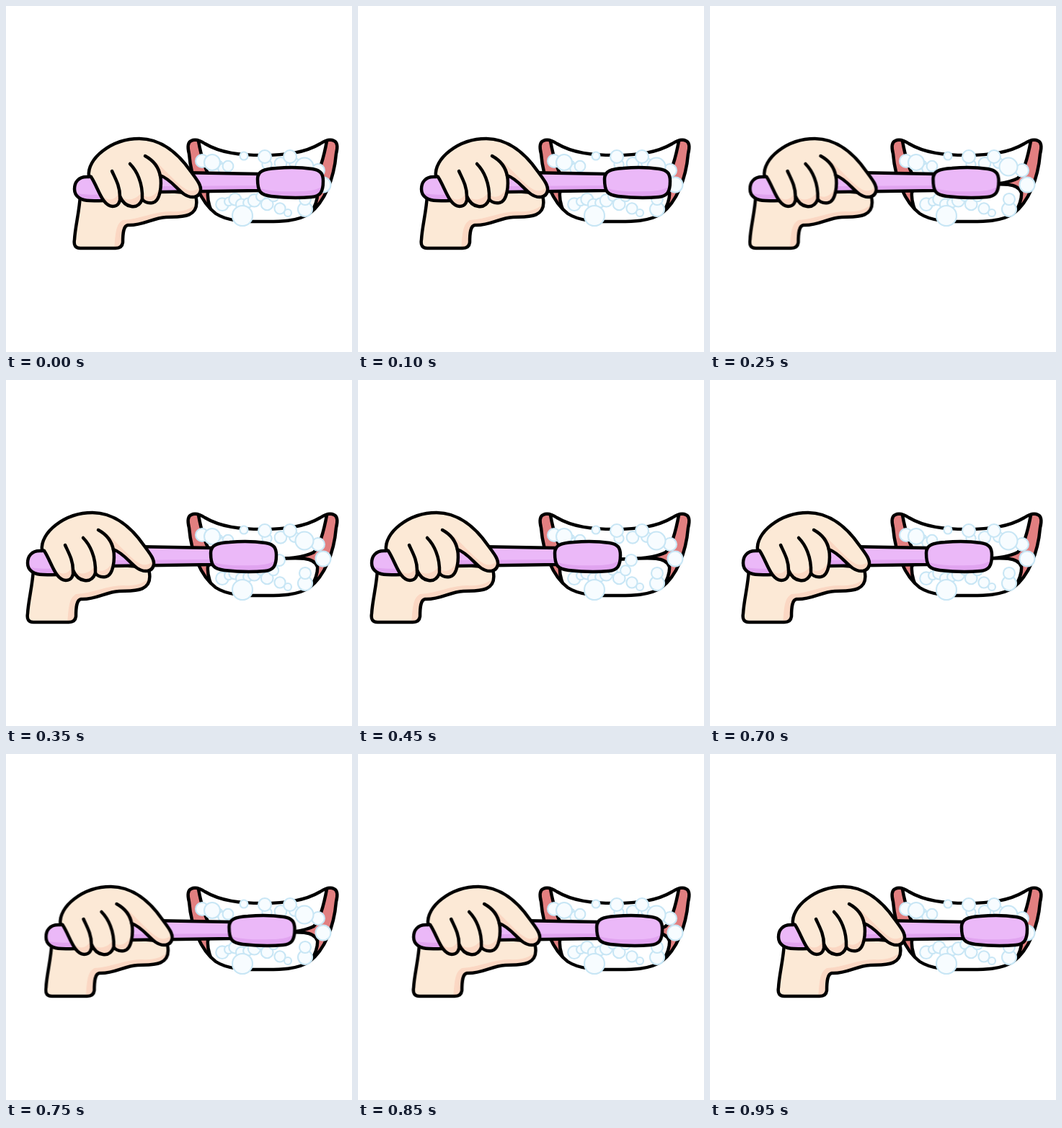
Recreate the animation shown at these times as an HTML page. Size 480 by 480 pixels, loop 1 s.

```html
<!DOCTYPE html>
<html lang="en">
<head>
<meta charset="utf-8">
<title>Brushing teeth</title>
<style>
  html, body { margin: 0; width: 100%; height: 100%; overflow: hidden; background: #fff; }
  svg { display: block; width: 100vw; height: 100vh; }
  .ink { stroke: #000; stroke-width: 4.5; stroke-linecap: round; stroke-linejoin: round; }
  .line { fill: none; }
  .lip { fill: #e27f80; }
  .tooth { fill: #fff; }
  .skin { fill: #fce9d6; }
  .skin-shade { fill: #fbd7c3; }
  .brush { fill: #ebb8f8; }
  .brush-shade { fill: #e1a4f0; }
  #foam circle { fill: #f7fcff; stroke: #c8e6f5; stroke-width: 2.1; }

  /* One stroke out and back, moving every 50 ms */
  #arm { animation: scrub 1s step-end infinite; }
  @keyframes scrub {
    0%, 5%    { transform: translateX(0); }
    10%       { transform: translateX(-7px); animation-timing-function: steps(3); }
    25%       { transform: translateX(-39.5px); animation-timing-function: steps(2); }
    35%       { transform: translateX(-65px); animation-timing-function: steps(2); }
    45%       { transform: translateX(-76px); }
    60%       { transform: translateX(-68px); animation-timing-function: steps(3); }
    75%       { transform: translateX(-39.5px); animation-timing-function: steps(3); }
    90%       { transform: translateX(-7px); }
    95%, 100% { transform: translateX(0); }
  }
</style>
</head>
<body>
<svg viewBox="0 0 480 480">
  <defs>
    <path id="lips" d="M257 187 C263 184 270 187 276 191 C298 204 325 207 356 207 C387 207 414 204 436 191 C442 187 449 184 455 187 C460 189 460 197 458 205 C455 240 442 272 421 288 C403 300 375 299 356 299 C337 299 309 300 291 288 C270 272 257 240 254 205 C252 197 252 189 257 187Z"/>
    <path id="palm" d="M103 262 C102 285 96 305 95 324 Q93 336 103 336 L152 336 Q161 336 162 328 C162 315 163 305 169 304 C190 305 203 294 222 293 C238 292 268 296 264 268 L262 260 L200 255Z"/>
    <path id="handle" d="M112 237 C100 237 95 245 95 254 C95 265 105 270 116 270 C150 271 190 268 214 258 L352 256 L352 233 L240 231 C200 232 130 237 112 237Z"/>
    <path id="head" d="M349 240 C349 229 358 226 375 225 C395 223 412 224 425 226 C437 228 440 233 440 243 C440 258 436 264 424 265 C405 267 385 266 368 264 C353 262 349 258 349 240Z"/>
    <path id="fingers" d="M115 236 C112 212 146 184 185 184 C216 184 240 206 256 229 C264 240 271 248 270 256 C268 267 256 267 247 261 C237 254 228 240 214 235 C216 246 215 271 203 273 C196 274 192 272 189 268 C186 276 181 279 174 278 C166 277 161 271 158 264 C159 271 156 278 148 278 C133 277 128 252 118 237Z"/>
    <clipPath id="in-lips"><use href="#lips"/></clipPath>
    <clipPath id="in-palm"><use href="#palm"/></clipPath>
    <clipPath id="in-handle"><use href="#handle"/></clipPath>
    <clipPath id="in-head"><use href="#head"/></clipPath>
    <clipPath id="in-fingers"><use href="#fingers"/></clipPath>
  </defs>

  <g id="mouth">
    <use href="#lips" class="lip"/>
    <g clip-path="url(#in-lips)">
      <path class="tooth ink" d="M266 182 C270 205 276 230 285 239 C300 247 330 249 356 249 C382 249 412 247 427 239 C436 230 442 205 446 182Z"/>
      <path class="tooth ink" d="M356 249 C400 247 427 243 432 259 C433 270 427 280 420 295 L356 310 L290 295 C284 284 279 270 280 259 C285 243 312 247 356 249Z"/>
    </g>
    <use href="#lips" class="ink line"/>
  </g>

  <g id="foam"></g>

  <g id="arm">
    <use href="#palm" class="skin"/>
    <g class="skin-shade" clip-path="url(#in-palm)">
      <path d="M150 340 C152 315 152 303 162 297 C185 296 205 285 228 285 C246 286 256 283 270 270 L270 302 L180 312 L164 340Z"/>
    </g>
    <use href="#palm" class="ink line"/>

    <use href="#handle" class="brush"/>
    <g class="brush-shade" clip-path="url(#in-handle)">
      <path d="M92 258 C105 264 150 264 214 250 L352 249 L352 275 L92 275Z"/>
    </g>
    <use href="#handle" class="ink line"/>

    <use href="#head" class="brush"/>
    <g class="brush-shade" clip-path="url(#in-head)">
      <path d="M345 250 C360 257 385 258 408 257 C424 257 434 254 442 248 L442 270 L345 270Z"/>
    </g>
    <use href="#head" class="ink line"/>

    <use href="#fingers" class="skin"/>
    <g class="skin-shade" clip-path="url(#in-fingers)">
      <path d="M136 265 C144 272 152 268 158 258 L160 282 L140 282Z"/>
      <path d="M160 265 C171 272 182 268 190 256 L190 281 L164 281Z"/>
      <path d="M190 263 C200 268 210 262 216 246 L216 277 L190 277Z"/>
      <path d="M200 210 C218 222 240 252 254 256 C262 257 267 254 272 248 L270 270 L240 264 L212 235Z"/>
    </g>
    <use href="#fingers" class="ink line"/>
    <path class="ink line" d="M147 229 C152 240 158 250 158 264 M172 219 C181 228 190 245 189 268 M193 208 C204 214 212 224 214 236"/>
  </g>
</svg>
<script>
  const foam = document.getElementById("foam");

  function bubble(cx, cy, r) {
    const dot = document.createElementNS("http://www.w3.org/2000/svg", "circle");
    for (const [key, value] of Object.entries({ cx, cy, r })) dot.setAttribute(key, value);
    foam.append(dot);
  }

  let seed = 11;
  function random(min, max) {
    seed = (seed * 16807) % 2147483647;
    return min + (max - min) * seed / 2147483647;
  }

  // Evenly spread along x, with random height and size
  function froth(count, left, right, top, bottom) {
    for (let i = 0; i < count; i++) {
      const x = left + (right - left) * i / (count - 1);
      bubble(x, random(top, bottom), random(5.5, 9.5));
    }
  }

  froth(4, 288, 308, 217, 227);
  froth(3, 362, 400, 217, 223);
  froth(10, 300, 380, 264, 283);

  // The large bubbles that stand out at the edges
  const big = [
    [272, 215, 9], [286, 217, 11], [330, 208, 5.5], [359, 209, 9], [394, 209, 9],
    [433, 228, 9], [414, 223, 12.5], [440, 248, 10.5], [379, 250, 8],
    [415, 282, 10], [415, 268, 8], [391, 287, 5], [328, 291, 14]
  ];
  for (const b of big) bubble(...b);
</script>
</body>
</html>
```
